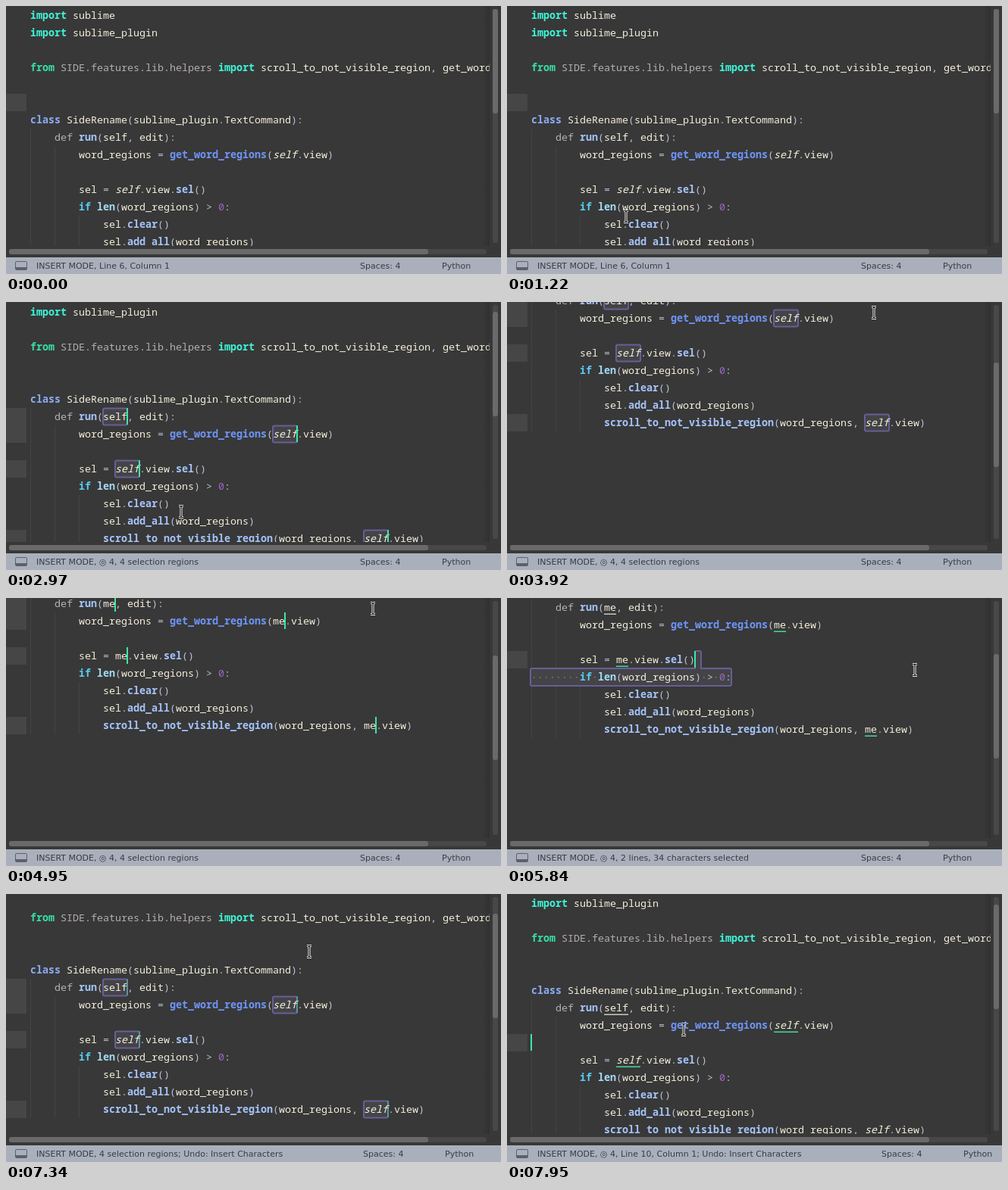
Write an HTML page that moves like this. It is 653x354 px and loops after 7.99 s.

```html
<!DOCTYPE html>
<html lang="en">
<head>
<meta charset="utf-8">
<title>Editor rename demo</title>
<style>
  html, body { margin: 0; width: 100%; height: 100%; overflow: hidden; background: #383838; }
  svg { display: block; }
  text { white-space: pre; }
  .code text { font: 13.333px "Noto Sans Mono", monospace; }
  .code .bold { font-weight: 700; }
  .code .slant { font-style: italic; }
  .bar text { font: 11px "DejaVu Sans", sans-serif; fill: #373c45; }
</style>
</head>
<body>
<svg width="653" height="354" viewBox="0 0 653 354">
  <defs>
    <clipPath id="pane"><rect width="638" height="317"/></clipPath>
    <clipPath id="barClip"><rect y="332" width="645" height="22"/></clipPath>
    <linearGradient id="shade">
      <stop offset="0" stop-opacity="0"/><stop offset="1" stop-opacity=".13"/>
    </linearGradient>
  </defs>
  <rect width="653" height="354" fill="#383838"/>
  <g clip-path="url(#pane)">
    <g id="page">
      <g id="back"></g>
      <g id="code" class="code"></g>
      <g id="marks"></g>
      <g id="carets" fill="#3ce8a4"></g>
    </g>
    <rect x="628" width="10" height="317" fill="url(#shade)"/>
  </g>
  <g id="popup" class="code">
    <rect x="128" y="27" width="166" height="62" fill="#444"/>
    <path d="M128 57.5H294" stroke="#555"/>
    <text x="135" y="46" fill="#c9efa4">def run(<tspan fill="#f0ec72">self</tspan>, <tspan fill="#f0ec72">edit</tspan>)</text>
    <text x="135" y="78" fill="#8990b0">features/rename.py</text>
  </g>
  <rect x="642" y="4" width="7" height="309" rx="3" fill="#484848"/>
  <rect id="thumb" x="642" width="7" height="138" rx="3" fill="#6a6a6a"/>
  <rect x="4" y="321" width="630" height="7" rx="3" fill="#484848"/>
  <rect x="4" y="321" width="553" height="7" rx="3" fill="#6a6a6a"/>
  <rect y="332" width="653" height="22" fill="#a9b0bb"/>
  <g class="bar" clip-path="url(#barClip)">
    <rect x="12.5" y="337.5" width="15" height="11" rx="1.5" fill="none" stroke="#5b616c"/>
    <rect x="13" y="345" width="14" height="3" fill="#5b616c"/>
    <text id="status" x="40" y="347"></text>
    <text id="spaces" y="347">Spaces: 4</text>
    <text id="syntax" y="347">Python</text>
  </g>
  <g id="mouse" stroke-linejoin="round">
    <path id="arrow" d="M.5 .5V15L4 11.8L6.5 17.3L9 16.2L6.6 10.8H11.2Z" fill="#111" stroke="#fff"/>
    <g id="beam" fill="none">
      <path d="M-3 -7.5H-1L0 -6.5L1 -7.5H3M0 -6.5V6.5M-3 7.5H-1L0 6.5L1 7.5H3" stroke="#fff" stroke-width="3"/>
      <path d="M-3 -7.5H-1L0 -6.5L1 -7.5H3M0 -6.5V6.5M-3 7.5H-1L0 6.5L1 7.5H3" stroke="#111" stroke-width="1.2"/>
    </g>
  </g>
</svg>
<script>
const LOOP = 7990, CHAR = 8, LINE = 23, LEFT = 32;
const $ = id => document.getElementById(id);

const codeLines = [
  'import sublime',
  'import sublime_plugin',
  '',
  'from SIDE.features.lib.helpers import scroll_to_not_visible_region, get_word_regions',
  '',
  '',
  'class SideRename(sublime_plugin.TextCommand):',
  '    def run(self, edit):',
  '        word_regions = get_word_regions(self.view)',
  '',
  '        sel = self.view.sel()',
  '        if len(word_regions) > 0:',
  '            sel.clear()',
  '            sel.add_all(word_regions)',
  '            scroll_to_not_visible_region(word_regions, self.view)'
];
const useLines = [8, 9, 11, 15];
const uses = useLines.map(line => ({ line, col: codeLines[line - 1].indexOf('self') }));

const keywords = { import: '#3df5d8', from: '#36e0a6', class: '#8cabf5', if: '#58cdf2', len: '#a4dcf8' };
const modules = ['SIDE', 'features', 'lib', 'helpers'];

const colX = col => LEFT + col * CHAR;
const lineY = line => 1 + (line - 1) * LINE;

// Returns [colour, extra class] for one token.
function styleOf(token, next, line) {
  if (keywords[token]) return [keywords[token], 'bold'];
  if (token === 'def') return ['#b3b3b8', ''];
  if (modules.includes(token)) return ['#b5aead', ''];
  if (token === '0') return ['#9c66c4', ''];
  if (token === 'self') return ['#f6f1de', line.includes('def ') ? '' : 'slant'];
  if (next === '(' && token !== 'SideRename' && /\w/.test(token))
    return [token === 'get_word_regions' ? '#6f95f8' : '#a6c4fb', 'bold'];
  return [/\w/.test(token) ? '#f4eedb' : '#bfc2d2', ''];
}

function codeMarkup(word) {
  return codeLines.map((raw, i) => {
    const line = raw.replace('self', word);
    return [...line.matchAll(/\w+|[^\w\s]/g)].map(({ 0: token, index }) => {
      const [fill, cls] = styleOf(token, line[index + token.length], line);
      const shown = token.replace('>', '&gt;');
      return `<text class="${cls}" x="${colX(index)}" y="${lineY(i + 1) + 16}" fill="${fill}">${shown}</text>`;
    }).join('');
  }).join('');
}

const rect = (x, y, w, h, attrs) => `<rect x="${x}" y="${y}" width="${w}" height="${h}" ${attrs}/>`;
const guide = (col, from) => rect(colX(col), lineY(from), 1, lineY(16) - lineY(from), 'fill="#444"');
const underline = (line, col, count, fill) => rect(colX(col), lineY(line) + 19.5, count * CHAR, 1.5, `fill="${fill}"`);

const GREEN = '#3edba0', PALE = '#c3cbc6';
const FRAME = 'fill="#444447" stroke="#675e98" stroke-width="2"';
const UNDO = '; Undo: Insert Characters';

// Each phase lasts until the next one starts.
const phases = [
  { at: 0, status: 'Line 6, Column 1', lines: [6], carets: [[6, 0]] },
  { at: 1590, status: 'Line 8, Column 14', lines: [8], carets: [[8, 13]], brackets: true },
  { at: 1700, status: '◎ 4, Line 8, Column 14', lines: [8], carets: [[8, 13]], brackets: true, under: 8 },
  { at: 2700, status: '◎ 4, 4 selection regions', lines: useLines, multi: true, boxed: true },
  { at: 4890, status: '◎ 4, 4 selection regions', lines: useLines, multi: true, word: 'm' },
  { at: 4940, status: '◎ 4, 4 selection regions', lines: useLines, multi: true, word: 'me' },
  { at: 5630, status: '◎ 4, Line 12, Column 34', lines: [12], carets: [[12, 33]], word: 'me', under: 9 },
  { at: 5740, status: '◎ 4, 2 lines, 34 characters selected', lines: [11], carets: [[11, 27]], word: 'me', under: 9, block: true },
  { at: 5960, status: '◎ 4, Line 11, Column 28', lines: [11], carets: [[11, 27]], word: 'me', under: 9 },
  { at: 6150, status: 'Line 11, Column 28', lines: [11], carets: [[11, 27]], word: 'me' },
  { at: 6700, status: '4 selection regions' + UNDO, lines: useLines, multi: true, boxed: true },
  { at: 7840, status: 'Line 10, Column 1' + UNDO, lines: [10], carets: [[10, 0]] },
  { at: 7950, status: '◎ 4, Line 10, Column 1' + UNDO, lines: [10], carets: [[10, 0]], under: 9 }
];

const scrollKeys = [[0, 0], [2930, 0], [2970, 21], [3120, 105], [3230, 155], [3310, 175],
  [4880, 175], [4990, 161], [7060, 161], [7240, 80], [7430, 23]];
const mouseKeys = [[0, 172, 358], [560, 172, 358], [680, 170, 347], [1050, 170, 347], [1480, 138, 174],
  [1720, 138, 174], [2200, 122, 343], [2520, 122, 343], [2900, 230, 277], [2970, 230, 277],
  [3310, 400, 190], [3640, 484, 14], [5290, 484, 14], [5580, 549, 106], [5680, 549, 106],
  [5840, 538, 95], [6050, 438, 94], [6880, 438, 94], [7300, 400, 76], [7500, 400, 76], [7820, 233, 179]];
// Caret blink: start, level, fade length.
const blinks = [[0, 0, 0], [400, 1, 260], [870, 0, 240], [1390, 1, 200], [1590, 1, 0], [1970, 0, 240],
  [2300, 1, 180], [3370, 0, 260], [3920, 1, 230], [4430, 0, 240], [4890, 1, 0], [5390, 0, 230],
  [5630, 1, 0], [6370, 0, 140], [6700, 1, 0], [7200, 0, 230], [7840, 1, 0]];

function tween(keys, t) {
  const i = keys.findLastIndex(k => k[0] <= t), a = keys[i], b = keys[i + 1] || a;
  const p = a === b ? 0 : (t - a[0]) / (b[0] - a[0]);
  return a.slice(1).map((v, n) => v + (b[n + 1] - v) * p);
}

function caretLevel(t) {
  const i = blinks.findLastIndex(b => b[0] <= t), [start, level, fade] = blinks[i];
  const before = i ? blinks[i - 1][1] : level;
  return fade ? before + (level - before) * Math.min(1, (t - start) / fade) : level;
}

function blockMarkup() {
  const x1 = colX(27), x2 = colX(28), x3 = colX(33), y1 = lineY(11), y2 = lineY(12), y3 = lineY(13);
  const path = `M${x1} ${y2}V${y1 + 2}Q${x1} ${y1} ${x1 + 2} ${y1}H${x2 - 2}Q${x2} ${y1} ${x2} ${y1 + 2}V${y2}` +
    `H${x3 - 2}Q${x3} ${y2} ${x3} ${y2 + 2}V${y3 - 2}Q${x3} ${y3} ${x3 - 2} ${y3}H${LEFT + 1}` +
    `Q${LEFT - 1} ${y3} ${LEFT - 1} ${y3 - 2}V${y2 + 2}Q${LEFT - 1} ${y2} ${LEFT + 1} ${y2}Z`;
  const dots = [0, 1, 2, 3, 4, 5, 6, 7, 10, 28, 30]
    .map(c => rect(colX(c) + 3, y2 + 11, 1.6, 1.6, 'fill="#77777c"')).join('');
  return `<path d="${path}" ${FRAME}/>${dots}`;
}

function showPhase(phase) {
  const word = phase.word || 'self', size = word.length;
  $('code').innerHTML = codeMarkup(word);
  $('back').innerHTML =
    phase.lines.map(n => rect(0, lineY(n), 27, LINE, 'fill="#464646"')).join('') +
    guide(0, 8) + guide(4, 9) + guide(8, 13) +
    (phase.boxed ? uses.map(u => rect(colX(u.col), lineY(u.line) + .5, 32, 22, `rx="2" ${FRAME}`)).join('') : '') +
    (phase.block ? blockMarkup() : '');

  let marks = '';
  if (phase.brackets) marks += underline(8, 11, 1, GREEN) + underline(8, 22, 1, GREEN);
  if (phase.under) marks += uses.map(u =>
    underline(u.line, u.col, size, (u.line === 8) === (phase.under === 8) ? GREEN : PALE)).join('');
  $('marks').innerHTML = marks;

  const carets = phase.multi ? uses.map(u => [u.line, u.col + size]) : phase.carets;
  $('carets').innerHTML = carets.map(([line, col]) => rect(colX(col) - 1, lineY(line), 2, 22, '')).join('');

  const label = $('status');
  label.textContent = 'INSERT MODE, ' + phase.status;
  const x = Math.max(467, Math.round(40 + label.getComputedTextLength() + 106));
  $('spaces').setAttribute('x', x);
  $('syntax').setAttribute('x', x + 108);
}

let current;
function draw(t) {
  const phase = phases.findLast(p => p.at <= t);
  if (phase !== current) showPhase(current = phase);
  const [scroll] = tween(scrollKeys, t), [mx, my] = tween(mouseKeys, t);
  $('page').setAttribute('transform', `translate(0 ${-Math.round(scroll)})`);
  $('thumb').setAttribute('y', 4 + Math.round(scroll * .435));
  $('carets').setAttribute('opacity', caretLevel(t));
  $('popup').setAttribute('visibility', t >= 6740 && t < 7060 ? 'visible' : 'hidden');
  $('mouse').setAttribute('transform', `translate(${Math.round(mx)} ${Math.round(my)})`);
  $('arrow').setAttribute('visibility', my >= 320 ? 'visible' : 'hidden');
  $('beam').setAttribute('visibility', my < 320 ? 'visible' : 'hidden');
}

const begin = performance.now();
function tick() {
  draw(Math.max(0, performance.now() - begin) % LOOP);
  requestAnimationFrame(tick);
}
tick();
</script>
</body>
</html>
```
